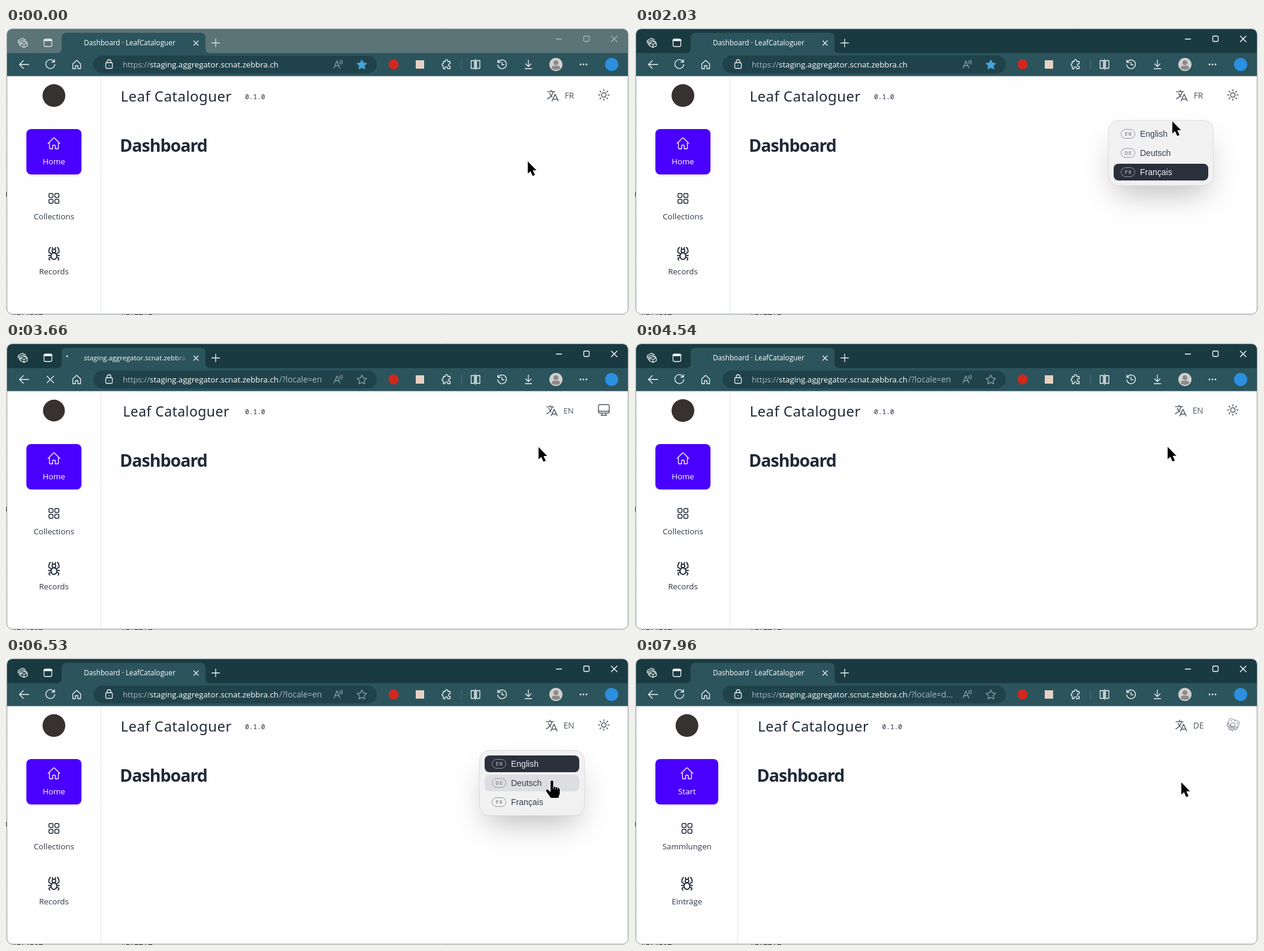
Write an HTML page that moves like this. It is 1040 px wide and 480 px high and loops after 8000 ms.

```html
<!DOCTYPE html>
<html lang="en">
<head>
<meta charset="utf-8">
<title>Dashboard</title>
<style>
  html, body { margin: 0; width: 100%; height: 100%; overflow: hidden; background: #f4f4f4; }
  svg { display: block; width: 100vw; height: 100vh; }
  text { font-family: "Open Sans", "Noto Sans", sans-serif; white-space: pre; }
  .line { fill: none; stroke-width: 1.3; stroke-linecap: round; stroke-linejoin: round; }
  .chrome { stroke: #eef3f4; }
  .dim { stroke: #8ba2a7; }
  .ink { stroke: #1f2937; stroke-width: 1.5; }
  .soft { stroke: #4f5864; stroke-width: 1.5; }
  .nav text { font-size: 13.3px; text-anchor: middle; fill: #2f3845; }
  .url { font-size: 13.23px; fill: #fff; }
  .url .grey, .url.grey { fill: #a9babe; }
  .menu text { font: 14px "Liberation Sans", Arial, sans-serif; fill: #363e4a; }
  .menu .code { font: bold 8.5px "Noto Sans Mono", monospace; letter-spacing: 1.2px; fill: #94979d; }
  .menu .pill { fill: none; stroke: #94979d; }
  .menu .on .bg { fill: #2a303c; }
  .menu .on .label { fill: #eef0f3; }
</style>
</head>
<body>
<svg viewBox="0 0 1040 480">
  <defs>
    <clipPath id="win"><rect x="2" y="2" width="1036" height="476" rx="8"/></clipPath>
    <clipPath id="tabClip"><rect x="126" y="10" width="177" height="30"/></clipPath>
    <filter id="blur" x="-100%" y="-150%" width="300%" height="400%"><feGaussianBlur stdDeviation="25"/></filter>
    <linearGradient id="fade"><stop offset="0" stop-color="#2b545d" stop-opacity="0"/><stop offset="1" stop-color="#2b545d"/></linearGradient>
  </defs>

  <!-- desktop behind the window -->
  <path d="M0 120.500h2M0 178.500h2M0 220.500h2M0 302.500h2M0 383.500h2M0 425.500h2M736.500 0v2M736.500 478v2" stroke="#d4d4d4"/>
  <rect y="274" width="1.500" height="8" fill="#555"/>
  <g font-size="13" fill="#444"><text x="9" y="488">#FA4507</text><text x="191" y="488">#FA77A7</text></g>

  <g clip-path="url(#win)">
    <rect x="2" y="2" width="1036" height="476" fill="#fefefe"/>
    <rect id="bar" x="2" y="2" width="1036" height="40"/>
    <path d="M85 42q8 0 8-8V16q0-8 8-8H325q8 0 8 8V34q0 8 8 8z" fill="#2b545d"/>
    <rect x="2" y="42" width="1036" height="38.500" fill="#2b545d"/>
    <rect x="146" y="46" width="473" height="30" rx="15" fill="#20434b"/>

    <!-- tab strip -->
    <g class="line chrome" id="strip">
      <path d="M20.500 25v-4l7-4 5 2.500M22.500 28.500v-5.500l6-3 6 3"/>
      <path d="M24.500 25l5.500-2.500 5.500 2.500v5l-5.500 2.500-5.500-2.500zM24.500 25l5.500 2.500 5.500-2.500M30 27.500v5"/>
      <rect x="63.500" y="18.500" width="13" height="12.500" rx="2.500"/><path d="M64 20.500h12" stroke-width="3"/>
      <path d="M343.500 25h13M350 18.500v13"/>
    </g>
    <path class="line chrome" d="M313.500 21.500l7.500 7.500m0-7.500l-7.500 7.500"/>
    <g class="line" id="controls" stroke-width="1">
      <path d="M918.500 18.500h9M1010.500 13.500l9.500 9.500m0-9.500l-9.500 9.500"/><rect x="964.500" y="13.500" width="9" height="9" rx="1.500"/>
    </g>
    <g clip-path="url(#tabClip)"><text id="tab" x="130" y="29" fill="#fff"></text></g>
    <rect id="tabFade" x="282" y="14" width="22" height="22" fill="url(#fade)"/>
    <circle id="spin" cx="102" cy="22" r="1.500" fill="#dce8ea"/>

    <!-- toolbar -->
    <g class="line chrome">
      <path d="M38 61H22.500m6.500-6.500l-6.500 6.500 6.500 6.500"/>
      <path id="reload" d="M80.500 56.500A7.500 7.500 0 1 0 81.500 61M81 53v4h-4.500"/>
      <path id="stop" d="M68.500 55.500l11 11m0-11l-11 11"/>
      <path d="M111.500 60l6.500-6 6.500 6v8h-4.500v-5h-4v5h-4.500z"/>
      <rect x="166.500" y="58" width="11" height="9.500" rx="1.500"/><path d="M169 58v-2a3 3 0 0 1 6 0v2M172 62.500v.5"/>
      <path d="M730 56h3.500a2.200 2.200 0 1 1 4 0h4v4a2.200 2.200 0 1 0 0 4v4h-4.500a2.200 2.200 0 1 0-4 0H730v-4.500a2 2 0 1 1 0-4z"/>
      <path d="M782 54.500h-5.500v13h5.500zM785.500 54.500h5.500v13h-5.500zM783.700 52.500v17"/>
      <path d="M821.500 57.500a7.300 7.300 0 1 1-.7 4M821 53.500v4h4M828 57v4.500h3.500"/>
      <path d="M872 53.500v11m-4.500-4.500l4.500 4.500 4.500-4.500M866.500 68h11"/>
    </g>
    <path d="M760.500 53v16" stroke="#4f737b"/>
    <g fill="#f2f6f7"><circle cx="959" cy="61" r="1.400"/><circle cx="964" cy="61" r="1.400"/><circle cx="969" cy="61" r="1.400"/></g>
    <path class="line dim" d="M547.500 67l5-12 5 12M549.500 63h6M557 55q2 2 0 4.500M560 53.500q3 3.500 0 7"/>
    <path id="star" stroke-width="1.300" stroke-linejoin="round" d="M594 53.500l2.400 4.900 5.400.8-3.900 3.800.9 5.400-4.800-2.500-4.800 2.500.9-5.400-3.900-3.800 5.400-.8z"/>
    <circle cx="647" cy="61" r="8.500" fill="#d0281e"/>
    <rect x="684" y="54" width="14" height="14" fill="#e6d2c4"/>
    <circle cx="918" cy="61" r="11" fill="#d2d0ce"/><circle cx="918" cy="58" r="4" fill="#8d8b89"/><path d="M911 68q0-5 4-5h6q4 0 4 5-7 4-14 0z" fill="#8d8b89"/>
    <circle cx="1011" cy="61" r="11" fill="#2c8fdf"/>
    <text class="url" x="195" y="66"><tspan class="grey">https://</tspan>staging.aggregator.scnat.zebbra.ch</text>
    <text class="url grey" id="query" x="456" y="66" style="font-size:13.600px"></text>

    <!-- sidebar -->
    <path id="edge" d="M158.500 80.500V478" stroke="#e3e5e8"/>
    <rect id="homeBg" x="34" y="169" height="76" rx="8" fill="#4a00ff"/>
    <g id="nav" class="nav">
      <circle id="logo" cx="80" cy="113" r="19" fill="#37312f"/>
      <path class="line" stroke="#fff" transform="translate(68 181)" d="m2.250 12 8.954-8.955c.44-.439 1.152-.439 1.591 0L21.750 12M4.500 9.750v10.125c0 .621.504 1.125 1.125 1.125H9.750v-4.875c0-.621.504-1.125 1.125-1.125h2.250c.621 0 1.125.504 1.125 1.125V21h4.125c.621 0 1.125-.504 1.125-1.125V9.750"/>
      <g class="line ink">
        <rect x="71.700" y="276.700" width="6.800" height="6.800" rx="2"/><rect x="81.500" y="276.700" width="6.800" height="6.800" rx="2"/>
        <rect x="71.700" y="286.500" width="6.800" height="6.800" rx="2"/><rect x="81.500" y="286.500" width="6.800" height="6.800" rx="2"/>
      </g>
      <g class="line ink" style="stroke-width:1.800px">
        <ellipse cx="80" cy="381.500" rx="4.800" ry="5.500"/><circle cx="80" cy="372.800" r="3"/>
        <path d="M78 370q-1-2-.5-3M82 370q1-2 .5-3M76 378l-4.500-3q-.5-5 2.500-8M84 378l4.500-3q.5-5-2.500-8"/>
        <path d="M75 380.500h-4M85 380.500h4M75.500 383.500l-3.500 1q-.5 2 1 3.500M84.500 383.500l3.500 1q.5 2-1 3.500"/>
      </g>
      <text x="80" y="228" style="fill:#fff"></text>
      <text x="80" y="320"></text>
      <text x="80" y="412"></text>
    </g>

    <!-- page header -->
    <g id="head" fill="#1f2937">
      <text id="title" x="191.500" y="123" font-size="24" font-weight="500" letter-spacing=".45" style="font-family:'Noto Sans','Open Sans',sans-serif">Leaf Cataloguer</text>
      <text x="399" y="119" style="font:11.200px 'Noto Sans Mono',monospace">0.1.0</text>
      <text x="190" y="207" font-size="28.500" font-weight="700" letter-spacing="-.95">Dashboard</text>
    </g>
    <g id="langBtn">
      <rect id="langBg" y="89" height="48" rx="8" fill="#d1d4d7"/>
      <path id="langIcon" class="line soft" d="m10.500 21 5.250-11.250L21 21m-9-3h7.500M3 5.621a48.474 48.474 0 0 1 6-.371m0 0c1.120 0 2.233.038 3.334.114M9 5.250V3m3.334 2.364C11.176 10.658 7.690 15.080 3 17.502m9.334-12.138c.896.061 1.785.147 2.666.257m-4.589 8.495a18.023 18.023 0 0 1-3.827-5.802"/>
      <text id="langText" y="118" font-size="13.800"></text>
    </g>
    <path id="sun" class="line soft" d="M12 3v2.250m6.364.386-1.591 1.591M21 12h-2.250m-.386 6.364-1.591-1.591M12 18.750V21m-4.773-4.227-1.591 1.591M5.250 12H3m4.227-4.773L5.636 5.636M15.750 12a3.750 3.750 0 1 1-7.500 0 3.750 3.750 0 0 1 7.500 0Z"/>
    <path id="desk" class="line soft" d="M9 17.250v1q0 1.300-.9 2.100L7.500 21h9l-.6-.6q-.9-.9-.9-2.100v-1M5.250 3h13.500A2.250 2.250 0 0 1 21 5.250V15a2.250 2.250 0 0 1-2.250 2.250H5.250A2.250 2.250 0 0 1 3 15V5.250A2.250 2.250 0 0 1 5.250 3zM3 12a2.250 2.250 0 0 0 2.250 2.250h13.500A2.250 2.250 0 0 0 21 12"/>

    <g id="menu" class="menu">
      <rect x="802" y="191" width="152" height="86" rx="14" opacity=".25" filter="url(#blur)"/>
      <rect x="790.500" y="154.500" width="175" height="109" rx="16" fill="#f1f1f2" stroke="#dcdcdf"/>
      <g id="rows"></g>
    </g>
  </g>
  <rect x="1.500" y="1.500" width="1037" height="477" rx="8.500" fill="none" stroke="#8b9799"/>

  <g id="cursor">
    <circle id="click" cx="-1" cy="-3" r="17.500" fill="#ebe42c" opacity=".72"/>
    <path id="arrow" d="M0 1V21.500l4.500-4 3.700 8 3.800-1.700-3.700-7.800h6.200z" stroke="#fff" stroke-width="1.200" paint-order="stroke"/>
    <g id="hand">
      <path d="M-2 2a2.200 2.200 0 0 1 4.500 0v8l7 1.500q4 1 4 4v6l-2.500 7.500H-1.500l-7-10q-2-3 0-4t4 2l2.500 2z" stroke="#fff" stroke-width="2" paint-order="stroke"/>
      <path d="M2.500 10v4M6 11v4M9.500 12v3" stroke="#fff" stroke-width=".8"/>
    </g>
  </g>
</svg>
<script>
const LOOP = 8000;
const $ = id => document.getElementById(id);
const set = (id, attrs) => { for (const k in attrs) $(id).setAttribute(k, attrs[k]); };
const show = (id, on) => set(id, { display: on ? 'inline' : 'none' });
const ramp = (t, start, len) => Math.min(1, Math.max(0, (t - start) / len));
const easeOut = u => 1 - (1 - u) * (1 - u);
const within = (t, a, b) => t >= a && t < b;
const scaleAt = (s, x, y) => `translate(${x} ${y}) scale(${s}) translate(${-x} ${-y})`;

const languages = [['EN', 'English'], ['DE', 'Deutsch'], ['FR', 'Français']];
$('rows').innerHTML = languages.map(([code, name], i) => `
  <g transform="translate(0 ${i * 32})">
    <rect class="bg" x="799" y="163" width="158" height="28" rx="8" fill="#dddee1"/>
    <rect class="pill" x="811.5" y="169.5" width="23" height="15" rx="7.500"/>
    <text class="code" x="817.5" y="180.300">${code}</text>
    <text class="label" x="843" y="182">${name}</text>
  </g>`).join('');

const pages = {
  FR: { left: 884, shift: 0, query: '', nav: ['Home', 'Collections', 'Records'] },
  EN: { left: 882, shift: 0, query: '/?locale=en', nav: ['Home', 'Collections', 'Records'] },
  DE: { left: 883, shift: 13.5, query: '/?locale=d...', nav: ['Start', 'Sammlungen', 'Einträge'] }
};

// The two page loads: commit of the address, new page, title back, theme icon turn
const loads = [
  { commit: 3590, ready: 3655, done: 3870, swap: 3940, lang: 'EN' },
  { commit: 7560, ready: 7610, done: 7830, swap: 7860, lang: 'DE' }
];
const opens = [950, 5230];
const clicks = [[810, 915], [3310, 3440], [5080, 5190], [7400, 7520]];
const hovers = [[530, 1813], [4730, 5782]];
const rowHovers = [[2163, 3655], [6219, 7610]];
const path = [
  [70, 871, 222], [820, 925, 122], [1680, 925, 122], [2030, 897, 155], [2460, 888, 170],
  [2920, 888, 170], [2990, 888, 171], [3655, 888, 171], [3656, 889, 173],
  [4540, 889, 173], [4950, 925, 122], [5710, 925, 122], [6470, 911, 204],
  [6530, 911, 205], [7610, 911, 205], [7611, 912, 207]
];

function cursorAt(t) {
  let i = 0;
  while (i < path.length - 2 && t >= path[i + 1][0]) i++;
  const [t0, x0, y0] = path[i], [t1, x1, y1] = path[i + 1];
  const u = easeOut(ramp(t, t0, t1 - t0));
  return [x0 + (x1 - x0) * u, y0 + (y1 - y0) * u];
}

function pop(t, start) {
  const u = (t - start) / 250;
  if (u < 0 || u > 1) return 1;
  return u < .4 ? .95 + .07 * easeOut(u / .4) : 1.02 - .02 * easeOut((u - .4) / .6);
}

const fadeIn = (t, spans) => Math.max(0, ...spans.map(([a, b]) => ramp(t, a, 200) - ramp(t, b, 200)));

function drawChrome(t) {
  const active = t >= 885;
  const load = loads.find(l => within(t, l.commit, l.done));
  const last = loads.filter(l => t >= l.commit).pop();
  set('bar', { fill: active ? '#1a3a41' : '#5b7477' });
  set('controls', { stroke: active ? '#fff' : '#a6b5b7' });
  set('strip', { opacity: active ? 1 : .85 });
  $('tab').textContent = load ? 'staging.aggregator.scnat.zebbra.ch' : 'Dashboard · LeafCataloguer';
  set('tab', { 'font-size': load ? 11.4 : 11.75 });
  show('tabFade', load);
  show('spin', load);
  show('stop', load);
  show('reload', !load);
  $('query').textContent = last ? pages[last.lang].query : '';
  set('star', last ? { fill: 'none', stroke: '#8ba2a7' } : { fill: '#43a5d8', stroke: '#43a5d8' });
}

function drawPage(t) {
  const load = loads.filter(l => t >= l.ready).pop();
  const lang = load ? load.lang : 'FR';
  const { left, shift, nav } = pages[lang];
  const grow = load ? pop(t, load.ready) : 1;

  set('edge', { transform: `translate(${shift ? 13 : 0} 0)` });
  set('homeBg', { width: 92 + (shift ? 13 : 0) });
  set('nav', { transform: `translate(${shift / 2} 0)` });
  set('head', { transform: `translate(${shift} 0)` });
  set('logo', { transform: scaleAt(grow, 80, 113) });
  set('title', { transform: scaleAt(grow, 283, 113) });
  document.querySelectorAll('#nav text').forEach((el, i) => el.textContent = nav[i]);

  const pressed = within(t, 890, 950) || within(t, 5150, 5230);
  const scale = pressed ? .97 : opens.reduce((s, o) => s * pop(t, o), grow);
  const hover = fadeIn(t, hovers);
  const tone = hover > .5 ? '#303947' : '#4f5864';
  set('langBtn', { transform: scaleAt(scale, (left + 966) / 2, 113) });
  set('langBg', { x: left, width: 966 - left, opacity: hover });
  set('langIcon', { transform: `translate(${left + 17} 101)`, style: `stroke:${tone}` });
  set('langText', { x: left + 48.7, fill: tone });
  $('langText').textContent = lang;

  const turn = load ? ramp(t, load.swap, 200) : 1;
  const mix = turn * turn * (3 - 2 * turn);
  set('sun', { transform: `translate(986 100) rotate(${-45 * (1 - mix)} 12 12)`, opacity: mix });
  set('desk', { transform: `translate(986 100) rotate(${45 * mix} 12 12)`, opacity: 1 - mix });

  const k = opens.findIndex((o, i) => within(t, o, loads[i].ready));
  show('menu', k >= 0);
  if (k >= 0) {
    const u = easeOut(ramp(t, opens[k], 200));
    set('menu', { opacity: u, transform: scaleAt(.95 + .05 * u, 878, 154) });
    [...$('rows').children].forEach((row, i) => {
      const on = languages[i][0] === lang;
      row.setAttribute('class', on ? 'on' : '');
      row.firstElementChild.setAttribute('opacity', on ? 1 : i === k ? fadeIn(t, [rowHovers[k]]) : 0);
    });
  }
  return { left, open: k >= 0 };
}

function drawCursor(t, { left, open }) {
  const [x, y] = cursorAt(t);
  const hand = (x > left && y < 137) || (open && y >= 163);
  set('cursor', { transform: `translate(${x.toFixed(1)} ${y.toFixed(1)})` });
  show('hand', hand);
  show('arrow', !hand);
  show('click', clicks.some(([a, b]) => within(t, a, b)));
}

const start = performance.now();
function frame(now) {
  const t = Math.max(0, now - start) % LOOP;
  drawChrome(t);
  drawCursor(t, drawPage(t));
  requestAnimationFrame(frame);
}
frame(start);
</script>
</body>
</html>
```
